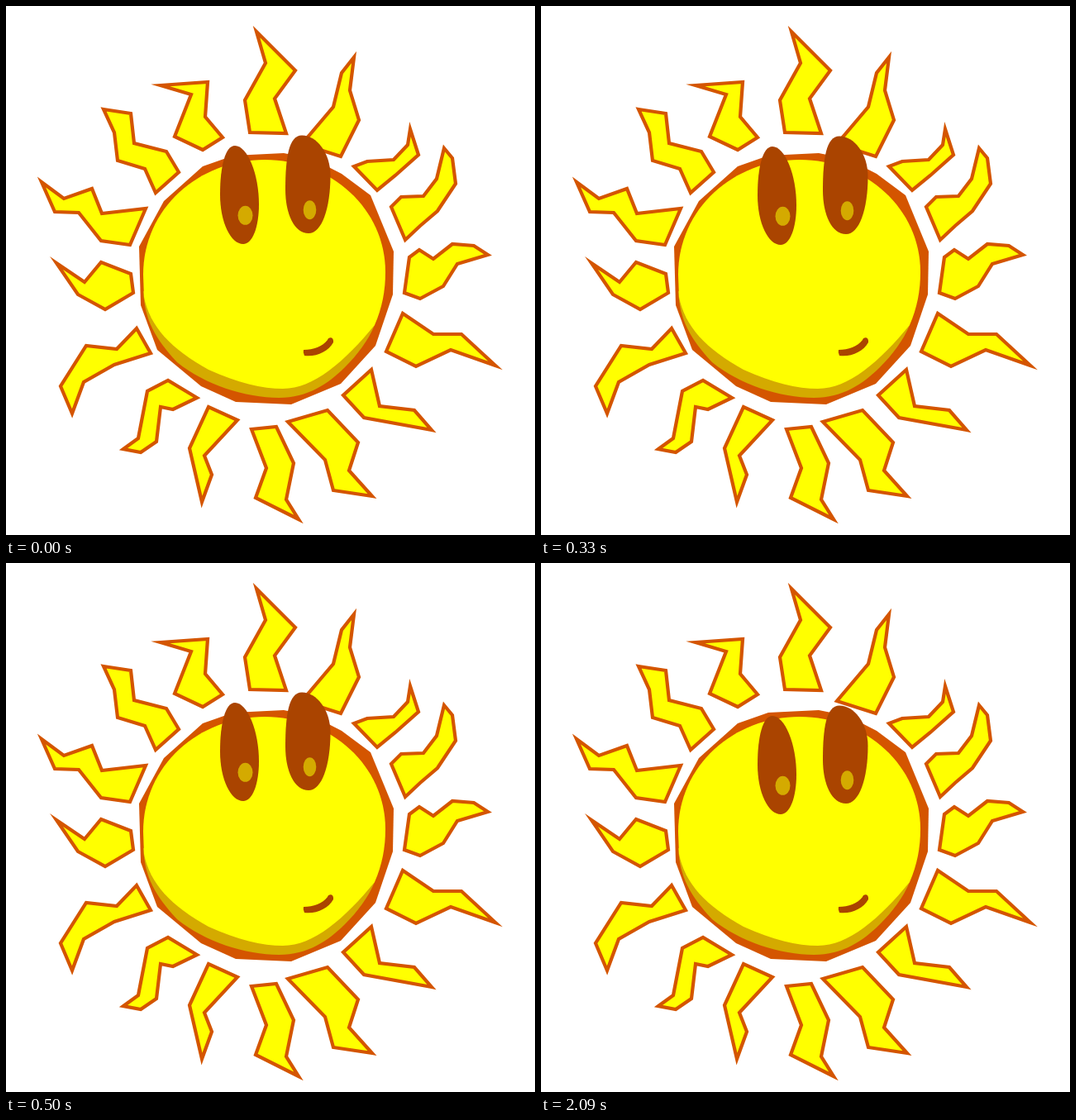
An HTML page with a canvas for the animation above (3.03 s loop, 640x640 px).

```html
<!DOCTYPE html>
<html lang="en">
<head>
<meta charset="utf-8">
<title>Winking sun</title>
<style>
html, body { margin: 0; width: 100%; height: 100%; overflow: hidden; background: #fff; }
canvas { display: block; width: 640px; height: 640px; }
</style>
</head>
<body>
<canvas id="stage" width="640" height="640"></canvas>
<script>
const ctx = document.getElementById('stage').getContext('2d');
const YELLOW = '#ffff00', ORANGE = '#d45500', BROWN = '#aa4400', OLIVE = '#d4aa00';
const LOOP = 3030;

function fill(d, color) {
  ctx.fillStyle = color;
  ctx.fill(new Path2D(d));
}

function stroke(d, color, width) {
  ctx.strokeStyle = color;
  ctx.lineWidth = width;
  ctx.stroke(new Path2D(d));
}

function ray(points) {
  const d = 'M' + points + 'Z';
  fill(d, YELLOW);
  stroke(d, ORANGE, 4.2);
}

function dot(x, y, rx, ry) {
  ctx.fillStyle = OLIVE;
  ctx.beginPath();
  ctx.ellipse(x, y, rx, ry, 0, 0, Math.PI * 2);
  ctx.fill();
}

function drawRays() {
  ctx.lineCap = 'butt';
  ray('303,31 350,78 325,112 339,154 295,153 289,114 314,69');
  ray('421,62 416,102 427,138 405,182 358,167 396,122 406,81');
  ray('489,149 499,180 471,205 449,223 421,194 437,188 469,186 486,168');
  ray('530,172 540,184 544,215 522,248 501,266 483,283 466,243 478,231 505,230 521,209');
  ray('583,301 546,312 529,339 501,354 482,347 488,304 500,295 517,306 540,288 566,290');
  ray('592,435 538,416 496,436 460,418 480,372 517,397 551,397');
  ray('515,513 433,498 408,471 442,440 452,484 494,489');
  ray('443,593 396,586 386,549 341,503 389,489 426,528 415,562');
  ray('354,621 302,595 315,559 297,512 327,509 348,553 339,597');
  ray('237,600 222,535 245,485 280,501 240,544 249,567');
  ray('142,536 160,523 171,466 196,453 231,474 202,488 187,485 182,527 163,540');
  ray('80,493 66,460 97,411 134,415 158,390 175,420 131,434 94,455');
  ray('61,311 95,334 115,310 151,324 154,347 120,367 87,349');
  ray('43,213 70,233 104,221 116,251 169,245 150,289 115,284 88,250 59,249');
  ray('118,125 151,130 155,166 194,176 209,201 181,226 168,197 135,187 131,153');
  ray('187,96 244,92 241,134 262,159 238,174 204,158 224,107');
}

function drawBody() {
  fill('M336 178L275 181 238 194 191 236 161 291 163 362 183 416 236 460 278 479 345 482 405 457 447 411 468 349 469 297 441 229 406 203 371 185Z', ORANGE);
  fill('M166 345C168 380 180 402 207 431C240 458 290 474 330 474C365 474 390 457 410 437C425 422 438 405 446 386Z', OLIVE);
  fill('M167 352C174 388 200 415 245 440C280 456 310 463 335 463C372 463 410 430 446 386C455 365 459 345 459 322C459 245 393 186 313 186C233 186 166 245 166 325Z', YELLOW);
  fill('M360 416C372 416 383 412 389 404C390 400 397 400 396 407C390 418 375 425 361 423Q359 419 360 416Z', BROWN);
}

function drawEyes(dx, dy) {
  ctx.save();
  ctx.translate(dx, dy);
  fill('M277 169C292 169 306 203 306 240C306 268 298 288 287 288C272 288 259 262 259 228C259 195 265 169 277 169Z', BROWN);
  fill('M358 156.5C376 156.5 392.5 178 392.5 205C392.5 245 382 275 366 275C349 275 338 252 338 222C338 184 342 156.5 358 156.5Z', BROWN);
  dot(289.5, 253.3, 9, 11.5);
  dot(367.5, 246.7, 7.8, 11.5);
  ctx.restore();
}

function drawLids() {
  ctx.lineCap = 'round';
  stroke('M231 268L250 253 277 248 304 259', BROWN, 12);
  stroke('M351 252L378 242 405 247 424 263', BROWN, 12);
}

const poses = [
  { until: 150, draw: () => drawEyes(0, 0) },
  { until: 330, draw: drawLids },
  { until: 360, draw: () => drawEyes(3, 1) },
  { until: 600, draw: () => drawEyes(0, 0) },
  { until: 690, draw: drawLids },
  { until: LOOP, draw: () => drawEyes(3, 16) }
];

const start = performance.now();

function render() {
  const t = Math.max(0, performance.now() - start) % LOOP;
  ctx.fillStyle = '#fff';
  ctx.fillRect(0, 0, 640, 640);
  ctx.lineJoin = 'miter';
  ctx.miterLimit = 20;
  drawRays();
  drawBody();
  poses.find(p => t < p.until).draw();
  requestAnimationFrame(render);
}
render();
</script>
</body>
</html>
```
